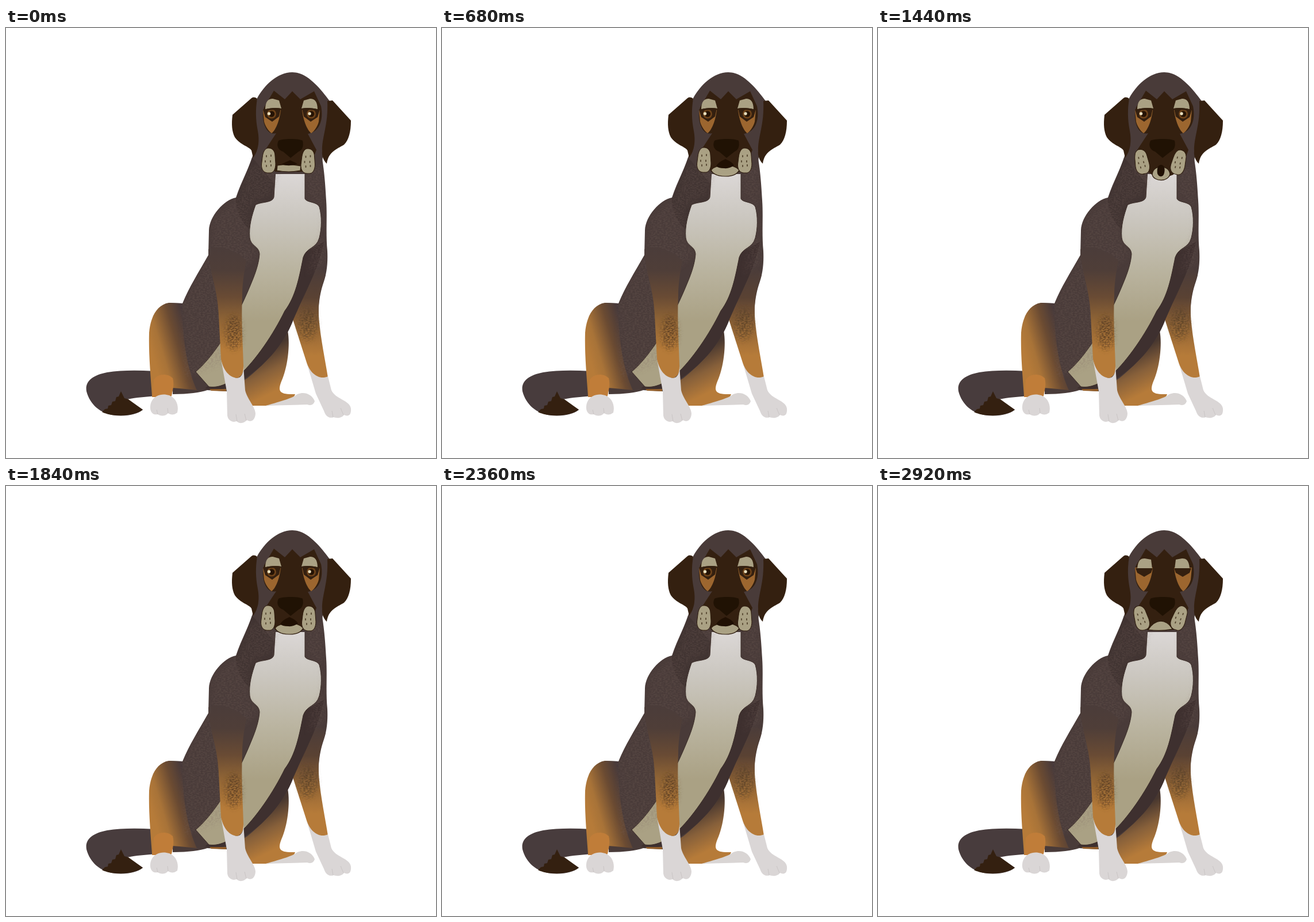
Write an HTML page that moves like this. It is 748 by 748 pixels and loops after 2.96 s.

```html
<!DOCTYPE html>
<html lang="en">
<head>
<meta charset="utf-8">
<title>Sitting dog</title>
<style>
html, body { margin: 0; width: 100%; height: 100%; overflow: hidden; background: #fff; }
svg { display: block; width: 100vw; height: 100vh; }
</style>
</head>
<body>
<svg viewBox="0 0 748 748">
<defs>
  <linearGradient id="bibFill" gradientUnits="userSpaceOnUse" x1="0" y1="250" x2="0" y2="510">
    <stop stop-color="#dcd8d7"/><stop offset=".3" stop-color="#cbc7c0"/>
    <stop offset=".65" stop-color="#bab4a0"/><stop offset="1" stop-color="#aaa184"/>
  </linearGradient>
  <linearGradient id="legFill" gradientUnits="userSpaceOnUse" x1="0" y1="375" x2="0" y2="560">
    <stop stop-color="#4a3c3a"/><stop offset=".25" stop-color="#4f3e38"/>
    <stop offset=".5" stop-color="#694b34"/><stop offset=".72" stop-color="#8f6435"/><stop offset="1" stop-color="#b67b39"/>
  </linearGradient>
  <linearGradient id="farLegFill" gradientUnits="userSpaceOnUse" x1="0" y1="415" x2="0" y2="570">
    <stop stop-color="#4a3c3a"/><stop offset=".35" stop-color="#5a4233"/>
    <stop offset=".72" stop-color="#976836"/><stop offset="1" stop-color="#b67b39"/>
  </linearGradient>
  <linearGradient id="haunchFill" gradientUnits="userSpaceOnUse" x1="254" y1="565" x2="322" y2="545">
    <stop stop-color="#b67b39"/><stop offset=".25" stop-color="#a87338"/>
    <stop offset=".65" stop-color="#6b4b32"/><stop offset="1" stop-color="#47393a"/>
  </linearGradient>
  <linearGradient id="farHaunchFill" gradientUnits="userSpaceOnUse" x1="440" y1="566" x2="472" y2="630">
    <stop stop-color="#48372f"/><stop offset=".5" stop-color="#87603a"/><stop offset="1" stop-color="#b67b39"/>
  </linearGradient>
  <filter id="grain" x="-20%" y="-20%" width="140%" height="140%">
    <feGaussianBlur in="SourceGraphic" stdDeviation="5" result="soft"/>
    <feTurbulence type="fractalNoise" baseFrequency=".28 .5" numOctaves="2" seed="4"/>
    <feColorMatrix values="0 0 0 0 0  0 0 0 0 0  0 0 0 0 0  0 0 0 4 -1.5" result="specks"/>
    <feComposite in="soft" in2="specks" operator="in"/>
  </filter>
  <path id="torso" d="M432 210 C428 235 410 264 400 295 C379 299 354 327 353 352 L352 395 C335 425 319 450 307 479
    L283 478 L300 560 L290 625 L290 637 C318 637 338 634 350 630 L384 632 L420 609 C453 582 484 550 500 507
    L520 530 L544 500 C543 482 546 463 551 447 C558 428 560 410 559 388 C556 355 559 330 557 300 C555 265 553 243 548 215Z"/>
  <clipPath id="torsoClip"><use href="#torso"/></clipPath>
  <g id="eye">
    <path fill="#9c662f" d="M447 142 L449 163 C452 174 458 180 462 183 C469 178 476 161 478 142Z"/>
    <g class="open">
      <path fill="#aaa184" d="M451 142 C451 128 456 123 464 123 L475 126 L479 140 C468 138 459 139 451 142Z"/>
      <path fill="#342010" d="M447 142 Q462 138 478 140 L475 154 L463 163 L451 155Z"/>
      <circle cx="462" cy="149.500" r="8" fill="#6e431a"/>
      <circle cx="462" cy="149.500" r="5.200" fill="#251304"/>
      <path fill="#342010" d="M447 142 Q462 138 478 140 L477 143 Q462 141 449 145Z"/>
    </g>
    <g class="shut">
      <path fill="#aaa184" d="M451 144 C452 130 456 126 464 126 L475 128 L477 144Z"/>
      <path fill="#342010" d="M448 143 L478 143 L475 151 L463 158 L451 151Z"/>
    </g>
  </g>
  <g id="pad">
    <path fill="#aaa184" stroke="#2c1a0c" stroke-width="1" d="M-2 -22 C6 -23 11 -17 11 -9 L12 5 C12 15 8 22 1 21 C-8 22 -13 16 -12.500 6 L-11 -6 C-10 -15 -7 -21 -2 -22Z"/>
    <path stroke="#54452f" stroke-width="1.800" stroke-linecap="round" d="M-4 -9v2 M4 -10v2 M-6 0v2 M3 0v2 M-4 8v2 M4 7v2"/>
  </g>
</defs>

<!-- tail and far hind leg -->
<path fill="#483c3d" d="M260 597 C230 595 200 595 176 599 C150 604 137 615 140 632 C146 655 164 671 190 674 C212 676 230 671 238 664 L211 646 C230 642 242 642 260 640Z"/>
<path fill="#342010" d="M200 632 L206 644 L213 646 L238 664 C222 676 185 677 167 668 L172 663 L177 662 L178 657 L183 656 L185 650 L190 649 L192 642 L196 641Z"/>
<path fill="url(#farHaunchFill)" d="M489 522 C495 545 491 585 481 610 C472 631 473 638 503 637 C500 648 478 655 452 657 L425 657 L400 620Z"/>
<path fill="#d9d5d4" d="M452 657 C480 649 500 643 505 638 C516 632 531 635 537 649 C535 656 530 657 524 655Z"/>

<!-- body -->
<use href="#torso" fill="#493b39"/>
<path fill="#3e302f" d="M428 225 C418 254 408 278 400 297 C400 318 410 338 425 352 L434 307 L463 300 L466 270Z" opacity=".65"/>
<path fill="url(#haunchFill)" d="M307 479 L283 478 C261 482 251 505 249 530 C248 565 251 598 254 640 L288 640 L290 626 C306 627 320 629 332 630 C314 590 306 535 307 479Z"/>
<path fill="url(#farLegFill)" d="M551 420 L556 430 C546 457 543 475 544 500 C546 535 555 575 560 608 C544 616 529 602 523 582 L499 507 C509 475 519 450 526 420Z"/>
<path fill="#3e302f" d="M553 372 C543 422 519 462 500 507 C482 553 450 588 409 614 C390 628 365 632 346 627 L380 600 L480 470 L518 392Z"/>
<path fill="#935f2b" d="M354 628 L383 628 L383 632 L357 631Z"/>
<path fill="url(#bibFill)" stroke="#3a2c27" stroke-width="1" d="M469 245 L520 245 L520 297 C523 304 541 302 545 311 C550 328 549 350 545 365 C540 384 523 381 517 399 C510 434 504 467 485 492 C465 533 435 577 407 603 C390 616 372 627 353 624 L330 598 C363 570 399 512 427 443 C435 424 440 408 441 393 C440 379 426 380 424 365 C422 345 428 325 434 308 C442 302 464 305 466 294Z"/>
<g clip-path="url(#torsoClip)">
  <path fill="#7d6860" opacity=".2" filter="url(#grain)" d="M425 240 L480 240 L460 290 L425 310 L420 365 L440 395 L395 430 L385 580 L310 610 L305 480 L355 390 L360 330 L405 295Z M522 245 L552 235 L555 410 L525 430 L530 390 L548 360 L550 310 L523 295Z"/>
</g>

<!-- near legs -->
<path fill="url(#legFill)" d="M352 385 C353 425 368 450 370 500 L374 576 C378 597 388 608 402 609 C411 606 414 598 413 586 C412 550 409 510 411 465 C411 450 413 430 418 405 C405 388 370 375 352 385Z"/>
<g fill="#49331f" filter="url(#grain)">
  <ellipse cx="396" cy="530" rx="14" ry="30" opacity=".65"/>
  <ellipse cx="525" cy="515" rx="16" ry="28" opacity=".55"/>
</g>
<g fill="#dad6d6">
  <path d="M374 576 C378 596 389 608 402 609 C410 608 413 601 413 588 L416 630 C419 645 434 659 434 671 C433 684 425 686 419 682 C413 689 405 688 401 684 C393 687 386 682 385 674 L384 632Z"/>
  <path d="M523 582 C529 601 545 613 560 606 L566 630 C573 646 598 647 600 662 C601 675 594 676 588 673 C584 679 575 679 570 677 C562 680 556 675 553 666 L539 636Z"/>
</g>
<path fill="#c07d39" d="M254 642 L257 612 C263 601 281 600 290 609 C293 620 290 632 287 642Z"/>
<path fill="#dad6d6" d="M251 658 C252 641 269 634 284 639 C296 644 301 656 298 669 C292 674 286 673 282 670 C277 676 268 675 264 672 C255 674 250 667 251 658Z"/>
<path fill="none" stroke="#c6c1c1" stroke-width=".8" d="M402 684 L400 672 M418 683 L415 671 M569 677 L567 666 M587 673 L582 661 M282 670 L281 661 M264 672 L262 664"/>

<!-- head -->
<path fill="#493b39" d="M429 225 C433 180 429 150 437 122 C449 100 472 77 498 77 C523 77 545 103 563 127 C560 155 556 190 550 232 L522 254 L468 254Z"/>
<path fill="#342010" d="M437 123 C433 120 430 120 427 122 L394 151 C392 168 393 180 398 190 C408 204 423 206 427 213 L430 226 C440 212 441 195 438 179 C434 158 434 141 437 123Z"/>
<path fill="#342010" d="M559 127 L568 126 L600 161 C600 181 596 195 588 203 C575 211 561 215 558 236 C552 230 549 222 550 214 C549 190 561 169 559 127Z"/>
<path fill="#342010" d="M466 109 L485 124 L498 110 L512 124 L536 110 L548 136 C553 162 544 181 525 184 L540 212 L526 250 L468 250 L451 212 L470 183 C451 188 443 158 449 138Z"/>
<use href="#eye"/>
<use href="#eye" transform="matrix(-1 0 0 1 993 0)"/>
<g id="glints" fill="#e9dfbd"><circle cx="457.500" cy="149" r="2.700"/><circle cx="528" cy="149" r="2.700"/></g>

<!-- muzzle -->
<path id="jaw" fill="#342010"/>
<path id="chin" fill="#aaa184" stroke="#2c1a0c" stroke-width="1.200"/>
<path id="mouth" fill="#201003"/>
<use id="leftPad" href="#pad"/>
<use id="rightPad" href="#pad"/>
<path fill="#201204" d="M474 196 C480 192 510 192 516 196 C518 205 516 212 509 215 L495 226 L482 215 C473 212 470 204 474 196Z"/>
</svg>
<script>
const LOOP = 2960;
const $ = id => document.getElementById(id);

// Each pad is [x, y, angle].
const poses = {
  rest: {
    left: [457, 231, 0], right: [525.5, 232, 0],
    jaw: "M466 222 L520 222 L516 248 L470 249Z",
    chin: "M472 239 Q493 236 513 240 L512 248 Q492 252 471 248Z",
    mouth: "M479 237 L494 230 L507 236 Q494 242 479 237Z"
  },
  talk: {
    left: [456, 230, 0], right: [527, 231, 0],
    jaw: "M464 222 L520 222 L518 248 L470 250Z",
    chin: "M468 247 Q475 239 493 239 Q510 239 517 247 Q512 258 493 258 Q473 258 468 247Z",
    mouth: "M477 240 Q481 233 493 228 Q505 233 508 239 Q500 245 491 244 Q480 244 477 240Z"
  },
  round: {
    left: [459, 233, -12], right: [523, 234, 12],
    jaw: "M466 220 L518 220 L514 255 L501 260 L480 258 L470 250Z",
    chin: "M477 255 C478 237 506 237 508 254 C505 268 480 268 477 255Z",
    mouth: "M492 238 C499 238 500 247 497 255 C494 260 488 259 486 253 C485 246 486 239 492 238Z"
  },
  closed: {
    left: [458, 230, -18], right: [524, 230, 18],
    jaw: "M466 222 L518 222 L516 250 L469 251Z",
    chin: "M470 250 Q479 236 492 235 Q505 236 512 249 Q492 253 470 250Z",
    mouth: ""
  }
};

const cues = [[0, "rest"], [80, "talk"], [1360, "round"], [1520, "talk"], [2840, "closed"]];
const BLINK_START = 2840;

function draw(time) {
  const pose = poses[cues.findLast(([start]) => start <= time)[1]];
  for (const part of ["jaw", "chin", "mouth"]) $(part).setAttribute("d", pose[part]);
  for (const side of ["left", "right"]) {
    const [x, y, angle] = pose[side];
    $(side + "Pad").setAttribute("transform", `translate(${x} ${y}) rotate(${angle})`);
  }
  const blinking = time >= BLINK_START;
  document.querySelector(".open").style.display = blinking ? "none" : "";
  document.querySelector(".shut").style.display = blinking ? "" : "none";
  $("glints").style.display = blinking ? "none" : "";
}

const start = performance.now();
function tick() {
  draw((performance.now() - start) % LOOP);
  requestAnimationFrame(tick);
}
tick();
</script>
</body>
</html>
```
